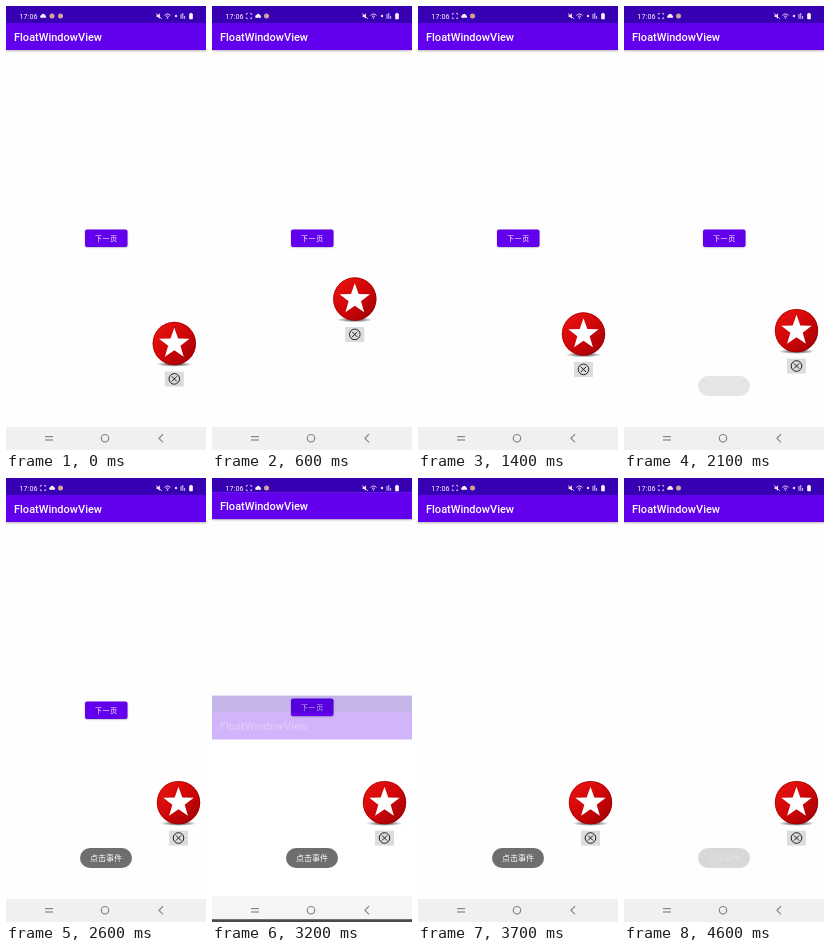
Animation, 200 px wide and 444 px high, one loop 4700 ms. Source, as an HTML page with a canvas:

```html
<!DOCTYPE html>
<html lang="zh">
<head>
<meta charset="utf-8">
<title>FloatWindowView</title>
<style>
html, body { margin: 0; width: 100%; height: 100%; overflow: hidden; background: #fff; }
canvas { display: block; width: 200px; height: 444px; }
</style>
</head>
<body>
<canvas id="stage"></canvas>
<script>
const W = 200, H = 444, LOOP = 4700, STEP = 100;
const LATIN = 'Roboto, "Noto Sans", sans-serif';
const CJK = '"Noto Sans CJK SC", "Noto Sans CJK", sans-serif';
const canvas = document.getElementById('stage');
const ctx = canvas.getContext('2d');
const dpr = window.devicePixelRatio || 1;
canvas.width = W * dpr;
canvas.height = H * dpr;

const clamp = v => Math.max(0, Math.min(1, v));
const lerp = (a, b, p) => a + (b - a) * p;
const smooth = p => p * p * (3 - 2 * p);

function rect(x, y, w, h, color) {
  ctx.fillStyle = color;
  ctx.fillRect(x, y, w, h);
}

function pill(x, y, w, h, r, color) {
  ctx.fillStyle = color;
  ctx.beginPath();
  ctx.roundRect(x, y, w, h, r);
  ctx.fill();
}

function disc(x, y, r, color) {
  ctx.fillStyle = color;
  ctx.beginPath();
  ctx.arc(x, y, r, 0, Math.PI * 2);
  ctx.fill();
}

function ring(x, y, r, color, width) {
  ctx.strokeStyle = color;
  ctx.lineWidth = width;
  ctx.beginPath();
  ctx.arc(x, y, r, 0, Math.PI * 2);
  ctx.stroke();
}

function line(points, color, width) {
  ctx.strokeStyle = color;
  ctx.lineWidth = width;
  ctx.beginPath();
  points.forEach(([x, y]) => ctx.lineTo(x, y));
  ctx.stroke();
}

function text(str, x, y, font, { align = 'left', spacing = 0, base = 'alphabetic' } = {}) {
  ctx.font = font;
  ctx.textAlign = align;
  ctx.textBaseline = base;
  ctx.letterSpacing = spacing + 'px';
  ctx.fillStyle = '#fff';
  ctx.fillText(str, x, y);
  ctx.letterSpacing = '0px';
}

// One activity: status strip, app bar, white body
function page(hasButton) {
  rect(0, 0, W, H, '#fefefe');
  rect(0, 0, W, 17, '#3700b3');
  ctx.save();
  ctx.shadowColor = 'rgba(0,0,0,.3)';
  ctx.shadowBlur = 2 * dpr;
  ctx.shadowOffsetY = 0.6 * dpr;
  rect(0, 17, W, 27, '#6200ee');
  ctx.restore();
  rect(0, 0, W, 17, '#3700b3');
  text('FloatWindowView', 8, 34.7, '500 11px ' + LATIN);
  if (hasButton) {
    ctx.save();
    ctx.shadowColor = 'rgba(0,0,0,.35)';
    ctx.shadowBlur = 1.5 * dpr;
    ctx.shadowOffsetY = 0.6 * dpr;
    pill(79, 223.5, 42.5, 17.5, 2, '#6200ee');
    ctx.restore();
    text('下一页', 89, 235.1, '500 7px ' + CJK, { spacing: 0.6 });
  }
  rect(0, 421, W, H - 421, '#f0f0f0');
}

function cloud(x, y) {
  disc(x - 1.3, y + 0.6, 1.5, '#eee');
  disc(x + 0.2, y - 0.3, 1.9, '#eee');
  disc(x + 1.7, y + 0.7, 1.4, '#eee');
}

function brackets(x, y) {
  const c = '#d8d0f0';
  for (const sx of [-1, 1]) for (const sy of [-1, 1]) {
    line([[x + sx, y + sy * 2.6], [x + sx * 2.6, y + sy * 2.6], [x + sx * 2.6, y + sy]], c, 0.8);
  }
}

function statusIcons(t) {
  const c = '#e6e0f6';
  text('17:06', 13.3, 12.9, '400 7.2px ' + LATIN, { spacing: 0.1 });
  if (t < 100) {
    cloud(37, 10);
    disc(46, 10, 2.5, '#d3a596');
  } else {
    brackets(37, 10);
    cloud(46, 10);
  }
  disc(54.5, 10, 2.5, '#d3a596');

  // muted speaker
  ctx.fillStyle = c;
  ctx.beginPath();
  ctx.moveTo(150.5, 9);
  ctx.lineTo(152, 9);
  ctx.lineTo(154, 7.3);
  ctx.lineTo(154, 12.7);
  ctx.lineTo(152, 11);
  ctx.lineTo(150.5, 11);
  ctx.fill();
  line([[150, 7.2], [156, 13]], c, 0.8);
  // wifi
  for (const r of [2, 4]) {
    ctx.strokeStyle = c;
    ctx.lineWidth = 0.9;
    ctx.beginPath();
    ctx.arc(161.5, 12, r, -Math.PI * 0.78, -Math.PI * 0.22);
    ctx.stroke();
  }
  disc(161.5, 12, 0.8, c);
  // data and signal
  disc(170, 10, 1.2, c);
  line([[175, 8], [175, 12.8]], c, 0.9);
  line([[176.8, 7], [176.8, 12.8]], c, 0.9);
  line([[178.6, 10], [178.6, 12.8]], c, 0.9);
  // battery
  rect(184.2, 6.9, 1.6, 1, '#fff');
  pill(183.2, 7.6, 3.6, 5.6, 0.6, '#fff');
}

function navIcons() {
  const c = '#858585';
  line([[39, 430.6], [47, 430.6]], c, 1.2);
  line([[39, 434], [47, 434]], c, 1.2);
  ring(99, 432.2, 3.7, c, 1.2);
  line([[157, 428.2], [153, 432.3], [157, 436.4]], c, 1.2);
}

function star(x, y, outer, inner) {
  ctx.fillStyle = '#fff';
  ctx.beginPath();
  for (let i = 0; i < 10; i++) {
    const r = i % 2 ? inner : outer;
    const a = -Math.PI / 2 + i * Math.PI / 5;
    ctx.lineTo(x + r * Math.cos(a), y + r * Math.sin(a));
  }
  ctx.fill();
}

function floatWindow([x, y]) {
  ctx.save();
  ctx.translate(x, y);
  ctx.save();
  ctx.translate(0, 20.8);
  ctx.scale(1, 0.14);
  const shade = ctx.createRadialGradient(0, 0, 5, 0, 0, 18);
  shade.addColorStop(0, 'rgba(0,0,0,.6)');
  shade.addColorStop(1, 'rgba(0,0,0,0)');
  disc(0, 0, 18, shade);
  ctx.restore();

  const red = ctx.createLinearGradient(-15, -15, 15, 16);
  red.addColorStop(0, '#e3120f');
  red.addColorStop(0.5, '#d00508');
  red.addColorStop(1, '#a90206');
  disc(0, 0, 21.7, red);
  ring(0, 0, 21.2, 'rgba(130,0,0,.45)', 0.9);
  star(0, 0.2, 16, 6.5);

  rect(-9.5, 28, 19, 15, '#dcdcdc');
  ring(0, 35.4, 5.3, '#222', 1);
  line([[-2.6, 32.8], [2.6, 38]], '#222', 1);
  line([[2.6, 32.8], [-2.6, 38]], '#222', 1);
  ctx.restore();
}

// Drag stops: time, x, y
const drag = [[0, 168.3, 337.5], [600, 142.8, 293], [1400, 165.5, 328], [1600, 172.5, 324.6]];

function ballAt(t) {
  for (let i = 1; i < drag.length; i++) {
    const [t0, x0, y0] = drag[i - 1], [t1, x1, y1] = drag[i];
    if (t < t1) {
      const p = smooth((t - t0) / (t1 - t0));
      return [lerp(x0, x1, p), lerp(y0, y1, p)];
    }
  }
  return drag[drag.length - 1].slice(1);
}

function toast(t) {
  const alpha = Math.min(clamp((t - 2000) / 600), clamp(1 - (t - 4110) / 670));
  if (!alpha) return;
  ctx.save();
  ctx.globalAlpha = alpha;
  pill(74, 370, 52, 20, 10, '#6e6e6e');
  text('点击事件', 100, 383, '400 8px ' + CJK, { align: 'center' });
  ctx.restore();
}

// The next page rises and fades in while the old one lifts slightly
function pages(t) {
  const p = clamp((t - 3100) / 600);
  if (p === 1) return page(false);
  const rest = (1 - p) ** 3;
  rect(0, 0, W, H, '#000');
  ctx.save();
  ctx.translate(0, -6.86 * (1 - rest));
  page(true);
  ctx.restore();
  if (!p) return;

  const layer = ctx.globalAlpha;
  ctx.save();
  ctx.globalAlpha = layer * Math.min(1, p * 1.76);
  ctx.translate(0, 376 * rest);
  const a = ctx.globalAlpha;
  // bands do not overlap, so one alpha holds for the whole sheet
  rect(0, 0, W, 17, '#3700b3');
  rect(0, 17, W, 27, '#6200ee');
  rect(0, 44, W, H, '#fefefe');
  ctx.globalAlpha = a;
  text('FloatWindowView', 8, 34.7, '500 11px ' + LATIN);
  ctx.restore();
}

function draw(t) {
  ctx.setTransform(dpr, 0, 0, dpr, 0, 0);
  pages(t);
  statusIcons(t);
  navIcons();
  toast(t);
  floatWindow(ballAt(t));
}

const start = performance.now();
function tick() {
  const t = (performance.now() - start) % LOOP;
  draw(Math.floor(t / STEP) * STEP);
  requestAnimationFrame(tick);
}
tick();
</script>
</body>
</html>
```
